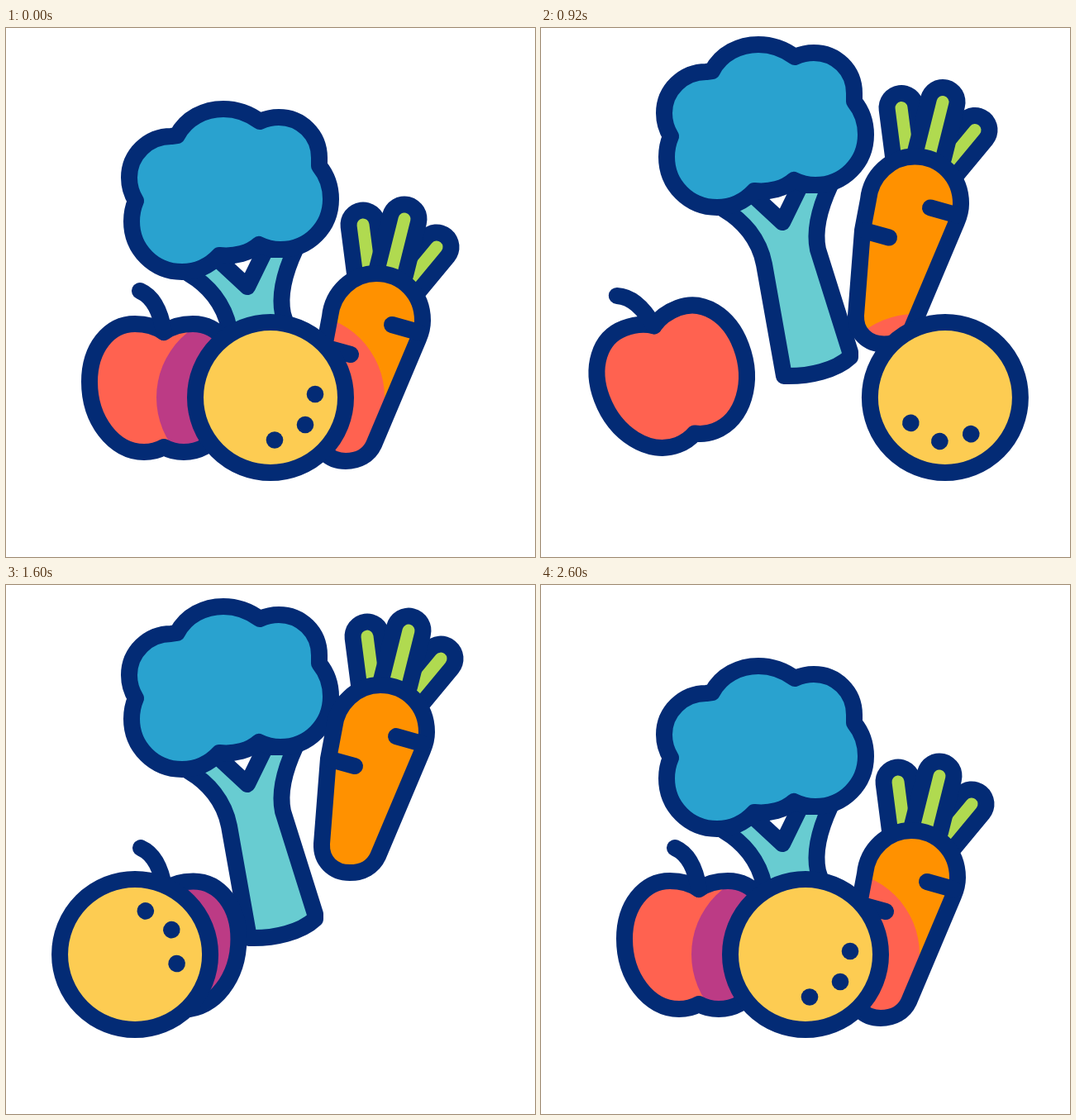
Write an HTML page with a canvas that moves like this. It is 640 px wide and 640 px high and loops after 3 s.

```html
<!DOCTYPE html>
<html lang="en">
<head>
<meta charset="utf-8">
<title>Vegetables</title>
<style>
  html, body { margin: 0; width: 100%; height: 100%; overflow: hidden; background: #fff; }
  canvas { display: block; width: 100vw; height: 100vh; }
</style>
</head>
<body>
<canvas id="stage" width="640" height="640"></canvas>
<script>
const ctx = document.getElementById('stage').getContext('2d');
const LOOP = 3000, STEP = 40, LINE = 20;
const NAVY = '#032b75', BLUE = '#29a2cf', TEAL = '#68ccd1', RED = '#ff6250',
      PURPLE = '#bc3b85', YELLOW = '#fdcc52', ORANGE = '#ff9100', GREEN = '#b0da50';

const shapes = {
  head: `M207 130 C218 109 240 98 263 98 C279 98 295 104 307 113
    C314 110 321 108 330 108 C357 108 379 129 379 157 L379 167
    C388 178 393 192 393 207 C393 241 366 268 332 268 C323 268 314 266 306 262
    C295 272 277 277 258 275 C245 289 230 295 213 295 C179 295 152 268 152 234
    C152 225 154 216 157 209 C152 201 149 191 149 181 C149 153 172 131 200 131 Z`,
  trunk: `M222 298 C244 311 264 333 270 364 L294 499 C325 500 357 492 374 476
    L374 470 L335 346 C330 322 337 296 350 268 L314 268 L292 313 L250 274 L225 262 Z`,
  carrot: `M392 349 C395 320 419 297 448 297 C480 297 504 322 504 354
    C504 362 502 369 499 376 L445 504 C439 517 426 524 411 524
    C391 524 376 510 377 489 L385 386 Z`,
  marks: 'M467 359 L499 368 M417 395 L388 387',
  apple: `M191 368 C181 361 169 358 156 358 C124 358 101 388 101 428
    C101 474 130 513 167 513 C176 513 184 511 191 507 C198 511 206 513 215 513
    C252 513 281 474 281 428 C281 388 258 358 226 358 C213 358 201 361 191 368 Z`,
  stem: 'M162 318 C178 325 187 343 191 368'
};
for (const name in shapes) shapes[name] = new Path2D(shapes[name]);

// The middle leaf comes last so that it covers its neighbours.
const leaves = ['M432 238 L440 300', 'M521 265 L487 306', 'M482 231 L466 295']
  .map(d => new Path2D(d));
const seeds = [[54, -4], [42, 33], [5, 51.5]];

// Cubic easing with control points (a, 0) and (b, 1).
function ease(x, a, b) {
  let low = 0, high = 1;
  for (let i = 0; i < 24; i++) {
    const s = (low + high) / 2, r = 1 - s;
    if (3 * a * s * r * r + 3 * b * s * s * r + s * s * s < x) low = s;
    else high = s;
  }
  return low * low * (3 - 2 * low);
}

// Keys are [time, value, a, b]; the easing belongs to the stretch before the key.
function track(keys, t) {
  if (t <= keys[0][0]) return keys[0][1];
  for (let i = 1; i < keys.length; i++) {
    const [start, from] = keys[i - 1];
    const [end, to, a = 0.5, b = 0.5] = keys[i];
    if (t < end) return from + (to - from) * ease((t - start) / (end - start), a, b);
  }
  return keys[keys.length - 1][1];
}

const motion = {
  ballX: [[200, 320], [860, 490.5, 0.62, 0.27], [1750, 150, 0.6, 0.2], [2600, 320, 0.645, 0.25]],
  ballTurn: [[200, 0], [840, 60, 0.6, 0.43], [1752, -77, 0.6, 0.43], [2600, 0, 0.5, 0.4]],
  appleTurn: [[200, 0], [450, -24], [640, -21], [851, -21], [1510, 0.3, 0.55, 0.55],
              [2000, 0.3], [2500, 0]],
  broccoliY: [[200, 0], [1173, -83, 0.3, 0.33], [2146, 0, 0.85, 0.67]],
  broccoliSquash: [[1840, 1], [2030, 0.939], [2400, 1]],
  carrotY: [[220, 0], [1652, -176, 0.45, 0.1], [2480, 0, 0.69, 0.55]]
};

function place(path, matrix) {
  const placed = new Path2D();
  placed.addPath(path, matrix);
  return placed;
}

function line(path, color = NAVY, width = LINE) {
  ctx.strokeStyle = color;
  ctx.lineWidth = width;
  ctx.stroke(path);
}

function fill(path, color) {
  ctx.fillStyle = color;
  ctx.fill(path);
}

function disc(x, y, r) {
  const path = new Path2D();
  path.arc(x, y, r, 0, 2 * Math.PI);
  return path;
}

function shaded(path, color, shade, shadeColor) {
  fill(path, color);
  ctx.save();
  ctx.clip(path);
  fill(shade, shadeColor);
  ctx.restore();
  line(path);
}

function drawBroccoli(y, squash) {
  const base = 509;
  const matrix = new DOMMatrix([1, 0, 0, squash, 0, y + base * (1 - squash)]);
  for (const [name, color] of [['trunk', TEAL], ['head', BLUE]]) {
    const path = place(shapes[name], matrix);
    fill(path, color);
    line(path);
  }
}

function drawCarrot(y, shade) {
  const matrix = new DOMMatrix().translate(-y * 5 / 176, y);
  for (const leaf of leaves) {
    const path = place(leaf, matrix);
    line(path, NAVY, 55);
    line(path, GREEN, 15);
  }
  shaded(place(shapes.carrot, matrix), ORANGE, shade, RED);
  line(place(shapes.marks, matrix));
}

function drawApple(turn, shade) {
  const matrix = new DOMMatrix().translate(143, 513).rotate(turn).translate(-143, -513);
  shaded(place(shapes.apple, matrix), RED, shade, PURPLE);
  line(place(shapes.stem, matrix));
}

function drawBall(x, turn) {
  const body = disc(x, 447, 91);
  fill(body, YELLOW);
  line(body);
  ctx.save();
  ctx.translate(x, 447);
  ctx.rotate(turn * Math.PI / 180);
  for (const [sx, sy] of seeds) fill(disc(sx, sy, 10.3), NAVY);
  ctx.restore();
}

// The ball's outline, stretched sideways into a capsule.
function ballShade(x) {
  const path = new Path2D();
  path.roundRect(x - 138, 346, 276, 202, 101);
  return path;
}

function draw(time) {
  const t = Math.floor(time % LOOP / STEP) * STEP;
  const now = name => track(motion[name], t);
  const ballX = now('ballX');
  const shade = ballShade(ballX);

  ctx.fillStyle = '#fff';
  ctx.fillRect(0, 0, 640, 640);
  ctx.lineCap = ctx.lineJoin = 'round';
  drawBroccoli(now('broccoliY'), now('broccoliSquash'));
  drawCarrot(now('carrotY'), shade);
  drawApple(now('appleTurn'), shade);
  drawBall(ballX, now('ballTurn'));
}

const begin = performance.now();
function tick() {
  draw(performance.now() - begin);
  requestAnimationFrame(tick);
}
tick();
</script>
</body>
</html>
```
